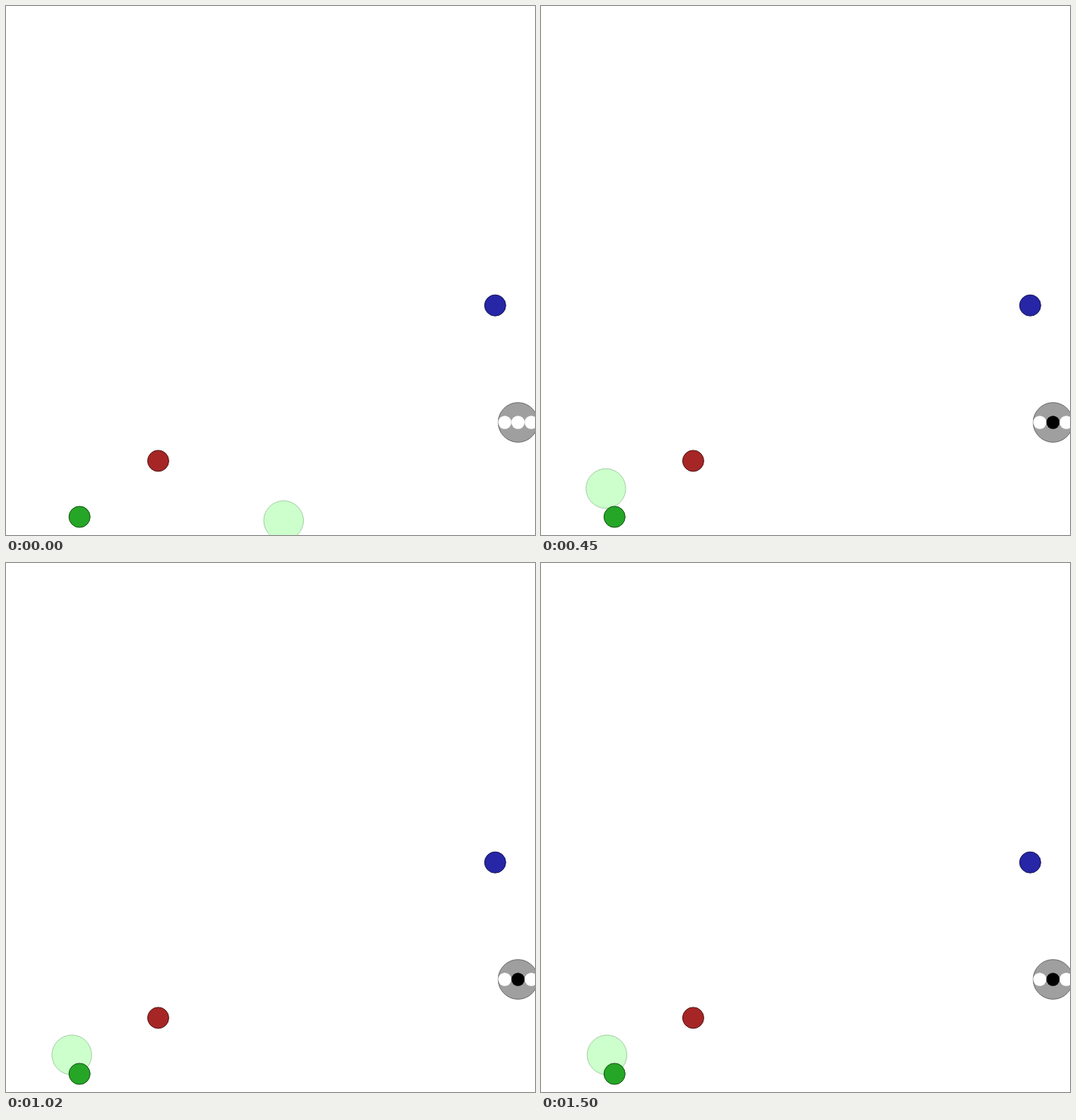
Write an HTML page with a canvas that moves like this. It is 700x700 px and loops after 1530 ms.

```html
<!DOCTYPE html>
<html>
<head>
<meta charset="utf-8">
<style>
html, body { margin: 0; width: 100%; height: 100%; overflow: hidden; background: #fff; }
canvas { display: block; }
</style>
</head>
<body>
<canvas id="stage" width="700" height="700"></canvas>
<script>
const ctx = document.getElementById('stage').getContext('2d');
const STEP = 30, STEPS = 51;
const IMPULSE = 17.5, DAMPING = 0.75;

// One push per step: left, right, up, down or none, ending in an up-down wobble.
const pushes = '-LLLLUDLUDRUDU--DUDLRU-D' + 'UD'.repeat(13);
const directions = { L: [-1, 0], R: [1, 0], U: [0, -1], D: [0, 1], '-': [0, 0] };

function buildPath() {
  let x = 367.35, y = 680.95, vx = 0, vy = 0;
  const path = [[x, y]];
  for (const push of pushes) {
    const [dx, dy] = directions[push];
    vx = vx * DAMPING + dx * IMPULSE;
    vy = vy * DAMPING + dy * IMPULSE;
    x += vx;
    y += vy;
    path.push([x, y]);
  }
  return path;
}

function disc(x, y, r, fill, line) {
  ctx.beginPath();
  ctx.arc(x, y, r, 0, Math.PI * 2);
  ctx.fillStyle = fill;
  ctx.fill();
  if (line) {
    ctx.strokeStyle = line;
    ctx.lineWidth = 1;
    ctx.stroke();
  }
}

const path = buildPath();

function draw(step) {
  ctx.fillStyle = '#fff';
  ctx.fillRect(0, 0, 700, 700);

  disc(677.5, 551, 26.25, '#9f9f9f', '#686868');
  disc(...path[step], 26.25, '#ccffcc', '#a3cfa3');

  disc(201.4, 601.9, 14, '#a62626', '#531313');
  disc(97.3, 676, 14, '#26a626', '#135313');
  disc(647.3, 396.2, 14, '#2626a6', '#131353');

  for (let i = -1; i <= 1; i++) {
    const lit = i === 0 && step > 0;
    disc(677.5 + i * 17.5, 551, 8.75, lit ? '#000' : '#fff');
  }
}

const start = performance.now();
function tick() {
  const elapsed = performance.now() - start;
  draw(Math.floor(elapsed / STEP) % STEPS);
  requestAnimationFrame(tick);
}
tick();
</script>
</body>
</html>
```
